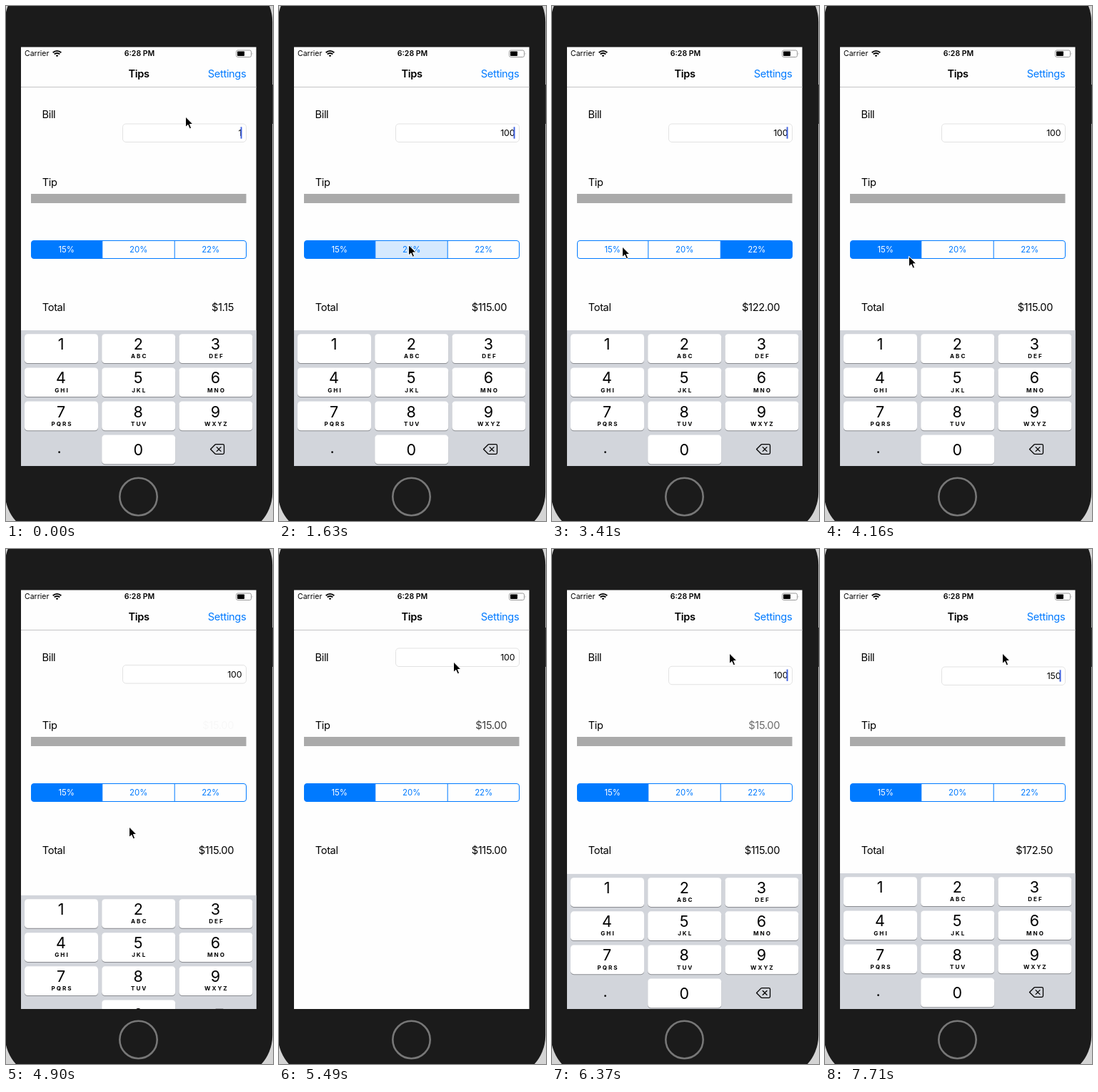
An HTML page that plays this animation: 374 by 721 pixels, repeating every 8 s.

```html
<!DOCTYPE html>
<html lang="en">
<head>
<meta charset="utf-8">
<title>Tip calculator</title>
<style>
  html, body { margin: 0; width: 100%; height: 100%; overflow: hidden; background: #d4d4d4; }
  svg { display: block; width: 100%; height: 100%; }
  text { font-family: Inter, "Open Sans", sans-serif; font-size: 14.6px; letter-spacing: -.024em; }
  .mid { text-anchor: middle; }
  .end { text-anchor: end; }
  .status { font-size: 10.5px; letter-spacing: 0; }
  .bold { font-weight: 600; }
  .blue { fill: #007aff; }
  .bill { font-size: 12.3px; letter-spacing: -.01em; }
  .seg { font-size: 11.4px; letter-spacing: 0; }
  .digit { font-size: 21.5px; letter-spacing: 0; }
  .letters { font-size: 8.1px; font-weight: 700; letter-spacing: 2px; }
</style>
</head>
<body>
<svg viewBox="0 0 374 721">
  <defs>
    <clipPath id="screen"><rect x="21" y="57.5" width="329.5" height="586.5"/></clipPath>
    <clipPath id="pill"><rect x="35.5" y="328.5" width="301" height="25" rx="3.5"/></clipPath>
  </defs>

  <rect x="371" y="110" width="3" height="55" fill="#444"/>
  <rect x="-1.5" y="-38" width="374.7" height="779" rx="60" fill="#1b1b1b"/>
  <circle cx="185.5" cy="687" r="26.2" fill="none" stroke="#777" stroke-width="2.6"/>

  <g clip-path="url(#screen)">
    <rect x="21" y="57" width="330" height="587" fill="#fefefe"/>

    <text class="status" x="26" y="70.3">Carrier</text>
    <g fill="none" stroke="#000" stroke-width="1.9">
      <path d="M65.7 65.2a8.3 8.3 0 0 1 11.6 0"/>
      <path d="M67.8 67.5a5.2 5.2 0 0 1 7.4 0"/>
      <path d="M71.5 71.3l-1.8-2a2.7 2.7 0 0 1 3.6 0z" fill="#000" stroke="none"/>
    </g>
    <text class="status bold mid" x="187" y="70.3">6:28 PM</text>
    <rect x="322.5" y="62" width="21" height="9.5" rx="2.2" fill="none" stroke="#999"/>
    <rect x="324" y="63.5" width="10" height="6.5" rx=".8"/>
    <path d="M344.8 65.2q1.6 1.5 0 3z" fill="#999"/>

    <text class="bold mid" x="186" y="100.2">Tips</text>
    <text class="blue end" x="336.3" y="100.2">Settings</text>
    <path d="M21 113.5H351" stroke="#c4c4c6"/>

    <text x="50.5" y="157.4">Bill</text>
    <text x="50.8" y="252.4">Tip</text>
    <text x="50.8" y="426.6">Total</text>
    <g id="field">
      <rect x="163.5" y="165" width="173" height="25.5" rx="4.5" fill="#fff" stroke="#e2e2e2"/>
      <text id="bill" class="bill end" x="330.4" y="182.1"></text>
      <rect id="caret" x="328.6" y="169.3" width="1.9" height="16.4" fill="#4062e0"/>
    </g>
    <text id="tip" class="end" x="319" y="251.6"></text>
    <rect x="35" y="263" width="301.5" height="13" fill="#aaa"/>
    <g id="segments" clip-path="url(#pill)"></g>
    <path d="M134.8 328.5v25M236.2 328.5v25" stroke="#007aff"/>
    <rect x="35.5" y="328.5" width="301" height="25" rx="3.5" fill="none" stroke="#007aff"/>
    <text id="total" class="end" x="319" y="426.6"></text>

    <g id="keyboard">
      <rect x="21" y="454" width="330" height="191" fill="#d2d5db"/>
      <g id="keys"></g>
      <text class="digit mid" x="74.5" y="626">.</text>
      <g fill="none" stroke="#000" stroke-width="1.3" stroke-linejoin="round" stroke-linecap="round">
        <path d="M286.5 620.5l6.2-6.3q.6-.6 1.4-.6h9.6q1.8 0 1.8 1.8v10.200q0 1.800-1.800 1.800h-9.600q-.8 0-1.400-.6z"/>
        <path d="M295.200 617.600l5.800 5.800m0-5.800l-5.800 5.800"/>
      </g>
    </g>
  </g>

  <path id="pointer" d="M0 0V14.600L3.400 11.400 5.700 16.800 8.100 15.800 5.900 10.500H10.400Z"
        stroke="#fff" stroke-width="1" stroke-linejoin="round"/>
</svg>

<script>
const LOOP = 8000, STEP = 148.3;
const $ = id => document.getElementById(id);
const ramp = (t, from, to) => Math.min(1, Math.max(0, (t - from) / (to - from)));
const smooth = p => p * p * (3 - 2 * p);
const easeOut = (p, power) => 1 - (1 - p) ** power;
const money = value => '$' + value.toFixed(2);
const latest = (track, t) => track.filter(([at]) => at <= t + 8).pop()[1];

const bills = [[0, 1], [150, 10], [300, 100], [6810, 10], [6960, 1], [7560, 15], [7710, 150]];
const rates = [[0, .15], [1780, .2], [2970, .22], [4010, .15]];
const presses = [[0, -1], [1630, 1], [1780, -1], [2820, 2], [2970, -1], [3860, 0], [4010, -1]];
const blink = [.7, .25, 0, .45, 1, 1, 1];

// Pointer moves: start, end, target x, target y
const home = [251.5, 155];
const moves = [
  [740, 1480, 181.5, 334.5],
  [1780, 2380, 283, 341.5],
  [2970, 3400, 98.5, 337],
  [4010, 4440, 172.5, 389],
  [5040, 5480, 244.5, 158],
  [5930, 6220, 248.5, 146]
];

$('segments').innerHTML = ['15%', '20%', '22%'].map((label, i) => {
  const x = [35, 134.8, 236.2, 337][i], width = [99.8, 101.4, 100.8][i];
  const box = `<rect x="${x}" y="328" width="${width}" height="26" fill="#007aff"`;
  const text = fill => `<text class="seg mid" x="${84.7 + i * 101}" y="345.200" fill="${fill}">${label}</text>`;
  return `${box} id="press${i}"/>${text('#007aff')}<g id="fill${i}">${box}/>${text('#fff')}</g>`;
}).join('');

const letters = ['', 'ABC', 'DEF', 'GHI', 'JKL', 'MNO', 'PQRS', 'TUV', 'WXYZ'];
const key = (col, row, digit, sub = '') => {
  const x = 26 + col * 108.2, y = 459.3 + row * 47.1, mid = x + 51.5;
  return `<rect x="${x}" y="${y + 1}" width="103" height="40.700" rx="4.500" fill="#898b90"/>
    <rect x="${x}" y="${y}" width="103" height="40.700" rx="4.500" fill="#fff"/>
    <text class="digit mid" x="${mid - .5}" y="${y + (row < 3 ? 22 : 28)}">${digit}</text>
    <text class="letters mid" x="${mid + 1}" y="${y + 34.1}">${sub}</text>`;
};
$('keys').innerHTML =
  letters.map((sub, i) => key(i % 3, Math.floor(i / 3), i + 1, sub)).join('') + key(1, 3, 0);

function pointerAt(t) {
  let [x, y] = home;
  for (const [from, to, toX, toY] of moves) {
    const p = smooth(ramp(t, from, to));
    x += (toX - x) * p;
    y += (toY - y) * p;
  }
  return `translate(${x} ${y})`;
}

function caretAlpha(step) {
  if (step >= 33 && step < 41) return 0;
  return step >= 5 && step < 33 ? blink[(step - 5) % 7] : 1;
}

function render(now) {
  const step = Math.min(52, Math.floor((now % LOOP + 4) / STEP));
  const t = step * STEP;
  const bill = latest(bills, t), rate = latest(rates, t), pressed = latest(presses, t);

  $('bill').textContent = bill;
  $('tip').textContent = money(bill * rate);
  $('total').textContent = money(bill * (1 + rate));
  $('caret').setAttribute('opacity', caretAlpha(step));

  const to20 = ramp(t, 1700, 1860), to22 = ramp(t, 2890, 3050), to15 = ramp(t, 3930, 4090);
  [1 - to20 + to15, to20 - to22, to22 - to15].forEach((alpha, i) => {
    $('fill' + i).setAttribute('opacity', alpha);
    $('press' + i).setAttribute('opacity', pressed === i ? .16 : 0);
  });

  const lift = smooth(ramp(t, 4800, 5300)) - smooth(ramp(t, 5780, 6280));
  const drop = easeOut(ramp(t, 4860, 5260), 2) - easeOut(ramp(t, 5880, 6300), 3);
  const tipAlpha = smooth(ramp(t, 4800, 5800)) - smooth(ramp(t, 5780, 6780));
  $('field').setAttribute('transform', `translate(0 ${-26 * lift})`);
  $('keyboard').setAttribute('transform', `translate(0 ${190 * drop})`);
  $('tip').setAttribute('opacity', tipAlpha);
  $('pointer').setAttribute('transform', pointerAt(t));
}

const start = performance.now();
function tick() {
  render(performance.now() - start);
  requestAnimationFrame(tick);
}
tick();
</script>
</body>
</html>
```
